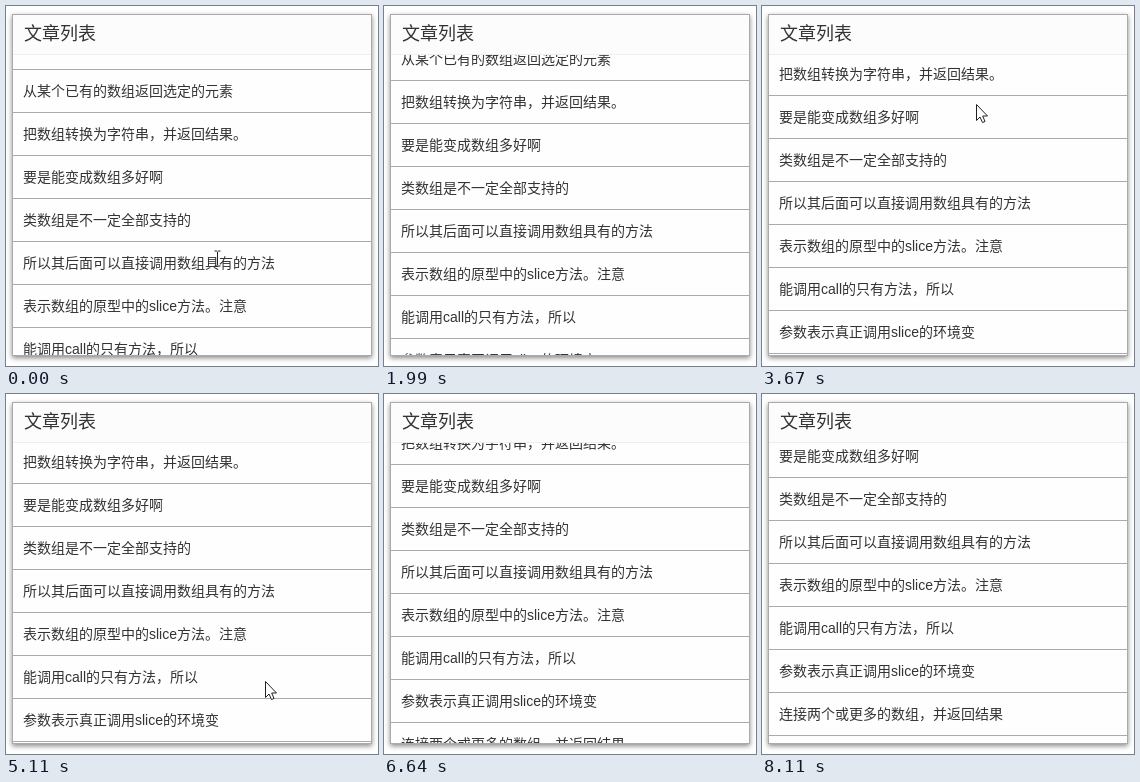
Recreate the animation shown at these times as an HTML page. Size 372 by 360 pixels, loop 8210 ms.

```html
<!DOCTYPE html>
<html lang="zh-CN">
<head>
<meta charset="utf-8">
<style>
html, body { margin: 0; width: 100%; height: 100%; overflow: hidden; background: #fff; }
body { position: relative; font: 14px "Liberation Sans", "Noto Sans CJK SC", "Noto Sans CJK", sans-serif; color: #333; }
.panel { position: absolute; left: 6px; top: 8px; width: 358px; height: 340px; border: 1px solid #aaa; background: #fefefe; box-shadow: 0 2px 5px #888; }
h1 { margin: 0; height: 39px; padding-left: 11px; border-bottom: 1px solid #eee; background: #fcfcfd; font-size: 18px; font-weight: 300; line-height: 39px; color: #333; }
.view { height: 300px; overflow: hidden; }
ul { margin: 0; padding: 0; list-style: none; border-top: 1px solid #aaa; }
li { height: 42px; padding-left: 10px; border-bottom: 1px solid #aaa; line-height: 42px; white-space: nowrap; }
svg { position: absolute; left: 0; top: 0; overflow: visible; }
</style>
</head>
<body>
<div class="panel">
  <h1>文章列表</h1>
  <div class="view">
    <ul id="list">
      <li>从某个已有的数组返回选定的元素</li>
      <li>把数组转换为字符串，并返回结果。</li>
      <li>要是能变成数组多好啊</li>
      <li>类数组是不一定全部支持的</li>
      <li>所以其后面可以直接调用数组具有的方法</li>
      <li>表示数组的原型中的slice方法。注意</li>
      <li>能调用call的只有方法，所以</li>
      <li>参数表示真正调用slice的环境变</li>
      <li>连接两个或更多的数组，并返回结果</li>
    </ul>
  </div>
</div>
<svg id="beam" width="8" height="18"><path d="M-3 -7.5h2.5m1 0h2.5M-3 7.5h2.5m1 0h2.5M0 -7V7" transform="translate(.5 .5)" fill="none" stroke="#222"/></svg>
<svg id="arrow" width="12" height="20"><path d="M.5 .5V16.5L4 13L6.5 18.5L9 17.5L6.7 12H11.5Z" fill="#fff" stroke="#222"/></svg>
<script>
const LOOP = 8210, TICK = 136.75, DELAY = 40;
const [list, beam, arrow] = ["list", "beam", "arrow"].map(id => document.getElementById(id));

// Key points: [time, values...]. The list rests while the pointer is over it.
const scroll = [[423, 0], [3309, 60.5], [5670, 60.5], [8108, 109.5]];
const leave = [[0, 211, 252], [DELAY, 211, 252], [430, 380, 246]];
const visit = [[3120, 185, -20], [3400, 205, 66], [3790, 222, 130], [4200, 306, 155],
  [4450, 300, 186], [4860, 219, 270], [5100, 259, 287], [5620, 320, 190], [5760, 380, 175]];

// Linear motion through key points, held at both ends
function along(path, t) {
  const i = path.findIndex(p => p[0] > t);
  if (i < 1) return path.at(i).slice(1);
  const [t0, ...a] = path[i - 1], [t1, ...b] = path[i];
  return a.map((v, j) => v + (b[j] - v) * (t - t0) / (t1 - t0));
}

function place(el, [x, y], shown) {
  el.style.display = shown ? "" : "none";
  el.style.transform = `translate(${Math.round(x)}px, ${Math.round(y)}px)`;
}

function draw(now) {
  // The picture refreshes in steps
  const t = Math.max(0, DELAY + TICK * Math.floor((now % LOOP - DELAY) / TICK));
  const pos = along(t < 2000 ? leave : visit, t);
  const resting = t <= DELAY;
  list.style.transform = `translateY(${14 - Math.floor(along(scroll, t)[0])}px)`;
  place(beam, pos, resting);
  place(arrow, pos, !resting);
  requestAnimationFrame(draw);
}
draw(performance.now());
</script>
</body>
</html>
```
